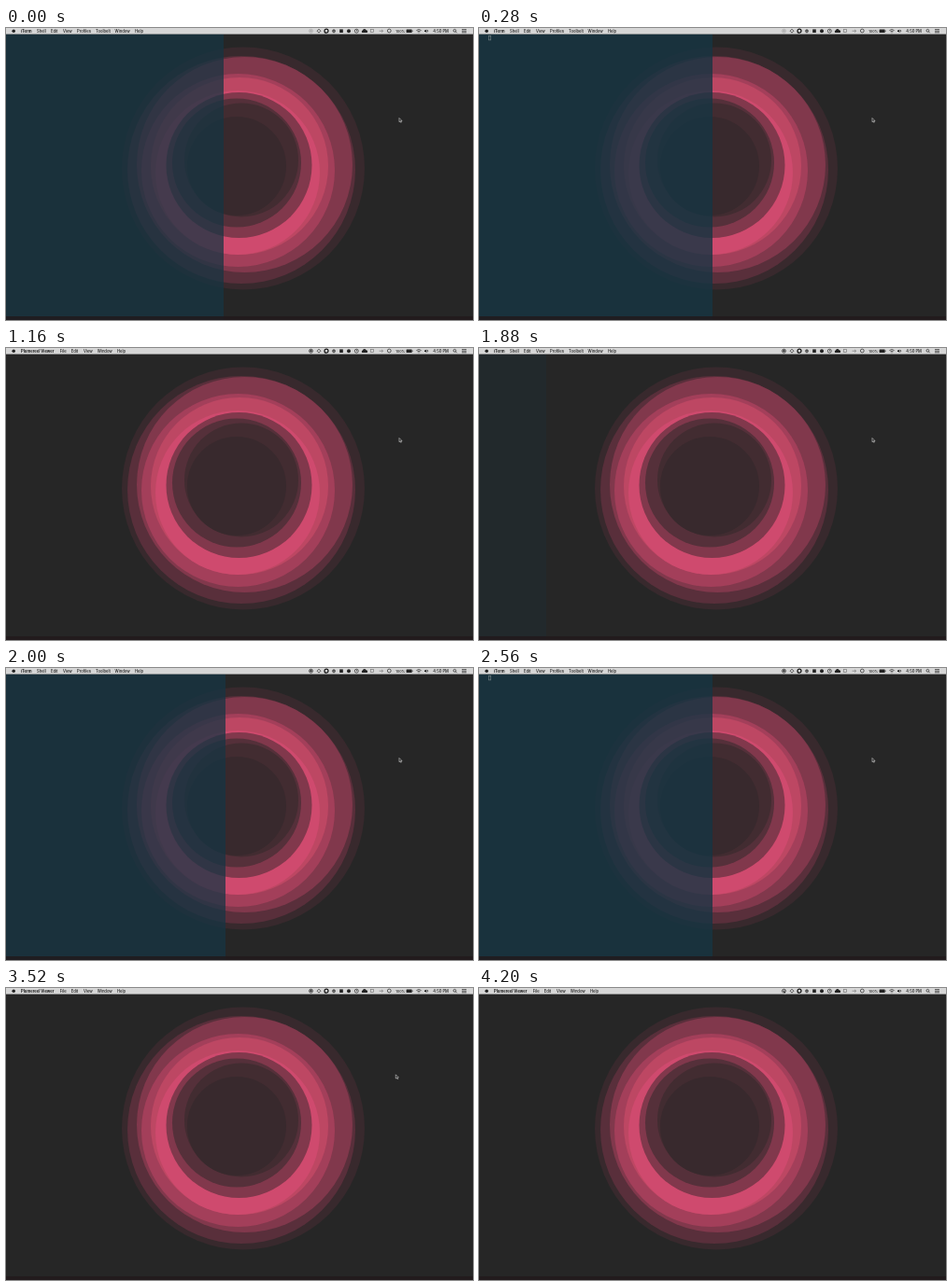
Recreate the animation shown at these times as an HTML page. Size 500x313 px, loop 4360 ms.

```html
<!DOCTYPE html>
<html lang="en">
<head>
<meta charset="utf-8">
<title>Sliding terminal</title>
<style>
  html, body { margin: 0; width: 100%; height: 100%; overflow: hidden; background: #262626; }
  svg { display: block; width: 100vw; height: 100vh; }
  text { font: 500 4.15px Inter, "Open Sans", sans-serif; fill: #1a1a1a; }
  .app { font-weight: 700; }
  .line { fill: none; stroke: #222; stroke-width: .7; }
</style>
</head>
<body>
<svg viewBox="0 0 500 313" preserveAspectRatio="none">
  <rect width="500" height="313" fill="#262626"/>
  <g id="rings"></g>

  <g id="term">
    <rect y="6" width="250" height="307" fill="#163543"/>
    <rect x="10.5" y="8.5" width="2.2" height="4.4" fill="none" stroke="#8fa0a2" stroke-width=".6"/>
  </g>
  <rect y="309" width="500" height="4" fill="#21181b" opacity=".8"/>

  <rect width="500" height="6.6" fill="#d6d6d6"/>
  <rect y="6.3" width="500" height=".5" fill="#8a8a8a"/>
  <circle cx="8.2" cy="3.2" r="1.8" fill="#222"/>
  <g id="termMenu"></g>
  <g id="playMenu"></g>

  <g fill="#222">
    <g id="record">
      <circle class="line" cx="326.5" cy="3.2" r="2"/>
      <circle cx="326.5" cy="3.2" r="1.1"/>
    </g>
    <path class="line" d="M335 1.2l1.9 2-1.9 2-1.9-2z"/>
    <circle cx="343" cy="3.2" r="2" fill="none" stroke="#111" stroke-width="1.2"/>
    <path class="line" d="M351 1v4.4M349.7 2.4h2.6v1.8h-2.6z"/>
    <rect x="357.2" y="1.4" width="3.6" height="3.6"/>
    <circle cx="367" cy="3.2" r="2"/>
    <circle class="line" cx="375.3" cy="3.2" r="2"/>
    <path d="M375 2h.7v1.6h-.7z"/>
    <path d="M381.4 5.1a1.5 1.5 0 0 1 .4-2.6 2 2 0 0 1 3.8-.2 1.5 1.5 0 0 1 .8 2.8z"/>
    <g opacity=".5">
      <rect class="line" x="390.4" y="1.6" width="3.2" height="3"/>
      <path class="line" d="M399.6 3.2h4M402 1.8l1.6 1.4-1.6 1.4"/>
    </g>
    <circle class="line" cx="410.3" cy="3" r="1.9"/>
    <text x="417.3" y="4.7" style="font-size:3.7px">100%</text>
    <rect x="428.6" y="1.6" width="6" height="3.3" rx=".5"/>
    <path d="M434.8 2.6h.6v1.3h-.6z"/>
    <path class="line" d="M439.4 2.6q2.6-2.2 5.2 0M440.5 3.8q1.5-1.2 3 0"/>
    <circle cx="442" cy="4.8" r=".5"/>
    <path d="M448 2.5h1l1.3-1.1v3.6l-1.3-1.1h-1z"/>
    <path class="line" d="M451.2 2q1 1.2 0 2.4"/>
    <text x="457.2" y="4.7">4:50 PM</text>
    <circle class="line" cx="480.4" cy="2.8" r="1.4"/>
    <path class="line" d="M481.4 3.8l1.3 1.4M488 1.6h5M488 3.2h5M488 4.8h5"/>
  </g>

  <path id="mouse" d="M0 0v4.2l1-.9.7 1.5.7-.3-.7-1.5h1.3z"
        fill="#111" stroke="#d8d8d8" stroke-width=".6"/>
</svg>

<script>
const LOOP = 4360, STEP = 40, SLIDE = 250, WIDTH = 250;
const NS = "http://www.w3.org/2000/svg";
const $ = id => document.getElementById(id);

function add(parent, tag, attrs, text) {
  const el = document.createElementNS(NS, tag);
  for (const key in attrs) el.setAttribute(key, attrs[key]);
  if (text) el.textContent = text;
  parent.append(el);
}

// cx, cy, radius, colour
[
  [254, 150.5, 130, "#38292d"],
  [252, 152, 122, "#592f3b"],
  [255.5, 146.5, 115.5, "#81384c"],
  [248.5, 152.5, 103.5, "#a33f5a"],
  [250, 148, 95, "#bd4763"],
  [248, 155, 88, "#cf4a6e"],
  [249.5, 147, 78, "#81384c"],
  [247, 144.5, 69, "#55303a"],
  [252, 141.5, 61, "#422c31"],
  [247, 148, 53, "#38292d"]
].forEach(([cx, cy, r, fill]) => add($("rings"), "circle", { cx, cy, r, fill }));

function menu(id, items) {
  items.forEach(([x, label], i) =>
    add($(id), "text", { x, y: 4.7, class: i ? "" : "app" }, label));
}
menu("termMenu", [[16, "iTerm"], [33, "Shell"], [48, "Edit"], [61, "View"],
  [76, "Profiles"], [96, "Toolbelt"], [116.5, "Window"], [138, "Help"]]);
menu("playMenu", [[16, "Plumereel Viewer"], [57.8, "File"], [69.7, "Edit"],
  [83, "View"], [97.7, "Window"], [119, "Help"]]);

const clamp = v => Math.min(1, Math.max(0, v));
const ease = v => (1 - Math.cos(Math.PI * clamp(v))) / 2;
const mix = (a, b, p) => a + (b - a) * p;

// begin, end, slide-in start, slide-out start
const visits = [[0, 1160, -208, 758], [1880, 3360, 1790, 3090]];

function openAmount(t) {
  const visit = visits.find(v => t >= v[0] && t < v[1]);
  return visit ? ease((t - visit[2]) / SLIDE) - ease((t - visit[3]) / SLIDE) : 0;
}

function mouseAt(t) {
  const far = ease((t - 3460) / 460), near = ease((t - 3920) / 240);
  return [mix(mix(421, 331.5, far), 326, near), mix(mix(96.5, 8, far), 2, near)];
}

function draw(now) {
  const t = Math.floor((now % LOOP) / STEP) * STEP;
  const open = openAmount(t);
  const width = Math.round(WIDTH * open);
  $("term").setAttribute("transform", `translate(${width - WIDTH} 0)`);
  $("term").setAttribute("opacity", 0.8 * open);

  const inTerm = visits.some(v => t >= v[0] && t < v[1]);
  $("termMenu").style.display = inTerm ? "" : "none";
  $("playMenu").style.display = inTerm ? "none" : "";
  $("record").setAttribute("opacity", t < 680 ? 0.25 : 1);
  $("mouse").setAttribute("transform", `translate(${mouseAt(t).join(" ")})`);
}

let start;
function frame(now) {
  start ??= now;
  draw(now - start);
  requestAnimationFrame(frame);
}
draw(0);
requestAnimationFrame(frame);
</script>
</body>
</html>
```
